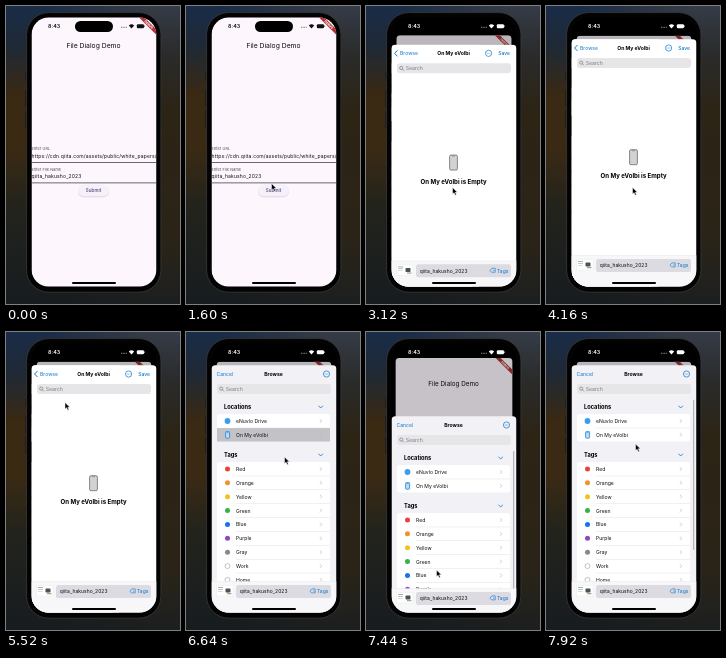
Animation, 174 px wide and 298 px high, one loop 8 s. Source, as an HTML page:

```html
<!DOCTYPE html>
<html lang="en">
<head>
<meta charset="utf-8">
<title>File dialog demo</title>
<style>
html, body { margin: 0; width: 100%; height: 100%; overflow: hidden; background: #1c1f20; }
svg { display: block; width: 174px; height: 298px; }
text { font-family: Inter, Roboto, sans-serif; dominant-baseline: central; white-space: pre; }
</style>
</head>
<body>
<svg id="stage" viewBox="0 0 174 298" xmlns="http://www.w3.org/2000/svg">
  <defs>
    <linearGradient id="wallLeft" x2="0" y2="1">
      <stop offset="0" stop-color="#1a2c48"/>
      <stop offset=".14" stop-color="#1f2935"/>
      <stop offset=".3" stop-color="#3a2913"/>
      <stop offset=".48" stop-color="#3a2a14"/>
      <stop offset=".68" stop-color="#22231c"/>
      <stop offset="1" stop-color="#171c20"/>
    </linearGradient>
    <linearGradient id="wallRight" x2="0" y2="1">
      <stop offset="0" stop-color="#353c47"/>
      <stop offset=".16" stop-color="#2a2b2b"/>
      <stop offset=".35" stop-color="#2c2415"/>
      <stop offset=".8" stop-color="#2a2418"/>
      <stop offset="1" stop-color="#1c1f20"/>
    </linearGradient>
    <linearGradient id="across">
      <stop offset=".2" stop-color="#fff" stop-opacity="0"/>
      <stop offset=".8" stop-color="#fff"/>
    </linearGradient>
    <mask id="fade"><rect width="174" height="298" fill="url(#across)"/></mask>
    <clipPath id="screen"><rect x="25.5" y="11.4" width="125" height="269.2" rx="17"/></clipPath>
    <clipPath id="card"><rect id="cardShape" x="25.5" y="11" width="125" height="271" rx="17"/></clipPath>
    <clipPath id="sheetShape"><path d="M25.5 300V37.3q0-4 4-4h117q4 0 4 4v263z"/></clipPath>
  </defs>
  <rect width="174" height="298" fill="url(#wallLeft)"/>
  <rect width="174" height="298" fill="url(#wallRight)" mask="url(#fade)"/>
  <g fill="#20201f">
    <rect x="19" y="66" width="2" height="9"/><rect x="19" y="84" width="2" height="17"/>
    <rect x="19" y="105" width="2" height="17"/><rect x="154" y="91" width="2" height="27"/>
  </g>
  <rect x="20.6" y="6.6" width="134.3" height="279.6" rx="22" fill="#030303" stroke="#3a3a3a" stroke-width=".8"/>
  <g clip-path="url(#screen)">
    <rect x="25" y="11" width="126" height="271"/>
    <g id="main" clip-path="url(#card)"></g>
    <g id="sheet" clip-path="url(#sheetShape)">
      <g id="browse"></g>
      <g id="folder"></g>
      <g id="bar"></g>
    </g>
    <rect x="66" y="276" width="44" height="2" rx="1"/>
  </g>
  <rect x="69" y="15" width="38" height="11" rx="5.5"/>
  <g id="status"></g>
  <path id="cursor" d="M0 0V6.6L1.6 5.2 2.7 7.7 3.9 7.2 2.8 4.8H4.9Z" stroke="#fff" stroke-width=".5" stroke-linejoin="round"/>
</svg>
<script>
const LOOP = 8000;
const BLUE = '#0877cf', INK = '#0c0c0e', GRAY = '#7d7d82';
const DEVICE = 'On My eVolbi', DRIVE = 'eNuvlo Drive', FILE = 'qiita_hakusho_2023';
const $ = id => document.getElementById(id);

const text = (x, y, s, size, fill = INK, extra = '') =>
  `<text x="${x}" y="${y}" font-size="${size}" fill="${fill}" ${extra}>${s}</text>`;
const bold = (x, y, s, size, extra = '') => text(x, y, s, size, '#000', `font-weight="650" ${extra}`);
const rect = (x, y, w, h, fill, rx = 0, extra = '') =>
  `<rect x="${x}" y="${y}" width="${w}" height="${h}" fill="${fill}" rx="${rx}" ${extra}/>`;
const line = (d, stroke, width = .7) =>
  `<path d="${d}" fill="none" stroke="${stroke}" stroke-width="${width}" stroke-linecap="round" stroke-linejoin="round"/>`;
const circle = (x, y, r, fill, extra = '') => `<circle cx="${x}" cy="${y}" r="${r}" fill="${fill}" ${extra}/>`;
const MID = 'text-anchor="middle"', SPACED = 'letter-spacing=".16"';

const search = () => rect(31, 52, 114, 10, '#e6e6e9', 3) +
  circle(35.2, 56.6, 1.6, 'none', `stroke="${GRAY}" stroke-width=".7"`) +
  line('M36.5 57.9l1.3 1.3', GRAY) + text(39.7, 57, 'Search', 5.2, GRAY);

const more = x => circle(x, 42, 3.1, 'none', `stroke="${BLUE}" stroke-width=".7"`) +
  [-1.4, 0, 1.4].map(d => circle(x + d, 42, .45, BLUE)).join('');

const phoneIcon = (x, y, w, h, fill, stroke) =>
  rect(x, y, w, h, fill, w * .18, `stroke="${stroke}" stroke-width=".8"`) +
  line(`M${x + w * .36} ${y + 1}h${w * .28}`, stroke, .6);

function drawMain() {
  const field = (y, label, value) =>
    text(25.6, y, label, 3.75, '#49454f', 'letter-spacing=".1"') + text(25.6, y + 7.2, value, 5, INK, SPACED) +
    rect(25, y + 13.5, 126, .8, '#49454f');
  $('main').innerHTML = rect(25, 11, 126, 271, '#fdf7fd') +
    text(87.5, 39, 'File Dialog Demo', 6.8, INK, MID) +
    field(142.5, 'Enter URL', 'https://cdn.qiita.com/assets/public/white_papers/') +
    field(163, 'Enter File Name', FILE) +
    rect(72, 179.2, 31, 12, '#00000026', 6) +
    rect(72, 178.4, 31, 12, '#f5f0fa', 6, 'id="button"') +
    text(87.6, 184.5, 'Submit', 4.5, '#4c3f70', MID + ' font-weight="500" letter-spacing=".1"') +
    `<g transform="translate(150.5 11) rotate(45)">${rect(-20, 8.9, 40, 3.8, '#b13538')}
     ${text(0, 10.9, 'DEBUG', 3.1, '#fff', MID + ' font-weight="800"')}</g>` +
    rect(25, 11, 126, 271, '#000', 0, 'id="dim"');
}

function drawBrowse() {
  const tags = [['Red', '#eb4138'], ['Orange', '#f0932a'], ['Yellow', '#f2c01f'], ['Green', '#35b24a'],
    ['Blue', '#1474e8'], ['Purple', '#9146c4'], ['Gray', '#88888c'], ['Work'], ['Home']];
  const PITCH = 13.86;
  const header = (y, s) => bold(38, y, s, 5.7) + line(`M132.7 ${y - .6}l2 2 2-2`, BLUE, .8);
  const row = (y, s, last) => text(50, y, s, 5.1) + line(`M134.2 ${y - 1.6}l1.6 1.6-1.6 1.6`, '#b9b9be') +
    (last ? '' : rect(50, y + 6.8, 94, .35, '#d3d3d6'));
  $('browse').innerHTML = rect(25, 33, 126, 260, '#f2f1f6') +
    text(30.5, 42, 'Cancel', 5.1, BLUE) + bold(87.5, 42, 'Browse', 5.1, MID) + more(140.5) + search() +
    header(74.6, 'Locations') + rect(31, 82, 113, 27.6, '#fff', 2.5) +
    rect(31, 96, 113, 13.6, '#c3c2c7', 0, 'id="picked"') +
    row(89, DRIVE) + row(102.8, DEVICE, true) +
    circle(41.5, 89, 2.9, '#3b9df0') + phoneIcon(39.6, 99.6, 4, 6.6, '#b9dcf5', '#2b83d2') +
    header(122.6, 'Tags') + rect(31, 130, 113, 160, '#fff', 2.5) +
    tags.map(([name, color], i) => {
      const y = 137 + i * PITCH;
      return row(y, name) + circle(41.5, y, 2.5, color || '#fff', color ? '' : 'stroke="#9a9a9e" stroke-width=".6"');
    }).join('') +
    rect(147.2, 68, 1, 150, '#8f8f94', .5, 'id="scroller"');
}

function drawFolder() {
  $('folder').innerHTML = rect(25, 33, 126, 260, '#fff') +
    `<g id="back">${line('M31.2 39.3l-2.6 2.7 2.6 2.7', BLUE, 1)}${text(34, 42, 'Browse', 5.1, BLUE)}</g>` +
    bold(87.6, 42, DEVICE, 5.1, MID) + more(122.6) +
    text(132.3, 42, 'Save', 5, BLUE, 'font-weight="500"') + search() +
    phoneIcon(83.6, 143.7, 7.8, 15, '#d2d2d4', '#6c6c70') +
    bold(87.6, 169.8, DEVICE + ' is Empty', 6.1, MID);
}

function drawBar() {
  $('bar').innerHTML = rect(25, 249.5, 126, 300, '#f7f7f9') + rect(25, 249.5, 126, .3, '#dcdce0') +
    rect(30.5, 253.5, 16.5, 10.5, '#fff', .5, 'stroke="#e2e2e5" stroke-width=".4"') +
    rect(32, 255.2, 5, .8, '#7fae76') + rect(32, 257.2, 5, .5, '#8c8c90') + rect(32, 259, 4.5, .5, '#b4b4b8') +
    rect(39.5, 256.6, 5, 4, '#4a5450', .8) + rect(41, 261.2, 4.5, 1, '#7b9a75') +
    rect(50, 253, 95, 13, '#dbdbe1', 2.5) + text(53.7, 259.3, FILE, 4.9, INK, 'letter-spacing=".1"') +
    line('M124.2 258.9l1.7-2h3.3v4h-3.3z', BLUE, .6) + circle(127.8, 258.9, .5, BLUE) +
    text(131, 259.3, 'Tags', 5, BLUE);
}

function drawStatus() {
  $('status').innerHTML = `<text x="42" y="20.2" font-size="5.4" font-weight="600">8:43</text>` +
    [0, 1, 2, 3].map(i => `<rect x="${115 + i * 1.6}" y="20.8" width="1" height="1" rx=".3" opacity=".6"/>`).join('') +
    `<path d="M122.8 19.6q2.7-2.6 5.4 0l-2.7 2.8z"/>
     <rect x="130.8" y="18.2" width="7.2" height="4" rx="1.2"/><rect x="138.3" y="19.5" width=".6" height="1.4"/>`;
}

const ease = u => u * u * (3 - 2 * u);
const ramp = (t, a, b) => Math.min(1, Math.max(0, (t - a) / (b - a)));

// Rows are [time, ...values], eased between neighbours
function track(rows, t) {
  const i = rows.findIndex(r => r[0] > t);
  if (i === 0) return rows[0].slice(1);
  if (i < 0) return rows[rows.length - 1].slice(1);
  const a = rows[i - 1], b = rows[i], u = ease(ramp(t, a[0], b[0]));
  return a.slice(1).map((v, k) => v + (b[k + 1] - v) * u);
}

const PATH = [[560, 20, 215], [1120, 84, 180], [1600, 85.5, 177.5], [2080, 86, 181], [3120, 86.5, 181.5],
  [4800, 86.5, 181.5], [5520, 59, 70.5], [6000, 38, 41], [6280, 38, 41], [6640, 98.5, 125],
  [6880, 97, 138], [7440, 70.5, 238], [7920, 89.5, 112]];
const DRAG = [[7040, 0], [7440, 51], [7720, 0]];
const OPEN = 2640, TRAVEL = 254;

function render(t) {
  const w = Math.max(0, t - OPEN) * .012;
  const slide = TRAVEL * (1 + w) * Math.exp(-w);
  const drag = track(DRAG, t)[0];
  const off = slide + drag, p = 1 - off / TRAVEL;
  const scale = 1 - .083 * p;

  $('main').setAttribute('transform', `translate(88 ${11 + 18.7 * p}) scale(${scale}) translate(-88 -11)`);
  $('cardShape').setAttribute('rx', 17 - 13 * Math.min(1, p * 4));
  $('dim').setAttribute('opacity', .27 * p);
  $('button').setAttribute('fill', t > 1840 && t < 2160 ? '#e6dff0' : '#f5f0fa');
  $('status').setAttribute('fill', p > .3 ? '#fff' : '#111');

  $('sheet').setAttribute('transform', `translate(0 ${off})`);
  $('bar').setAttribute('transform', `translate(0 ${Math.min(drag, 7) - drag})`);
  const pop = 1 - (1 - ramp(t, 6280, 6600)) ** 3;
  $('folder').setAttribute('transform', `translate(${126 * pop} 0)`);
  $('browse').setAttribute('transform', `translate(${-38 * (1 - pop)} 0)`);
  $('back').setAttribute('opacity', t > 6120 ? .35 : 1);
  $('picked').setAttribute('opacity', 1 - ramp(t, 6640, 6880));
  $('scroller').setAttribute('opacity', .8 * ramp(t, 6880, 7040));

  const [x, y] = track(PATH, t);
  $('cursor').setAttribute('transform', `translate(${x} ${y})`);
  $('cursor').setAttribute('opacity', t < 560 ? 0 : 1);
}

drawMain(); drawBrowse(); drawFolder(); drawBar(); drawStatus();
const start = performance.now();
(function tick() {
  render((performance.now() - start) % LOOP);
  requestAnimationFrame(tick);
})();
</script>
</body>
</html>
```
